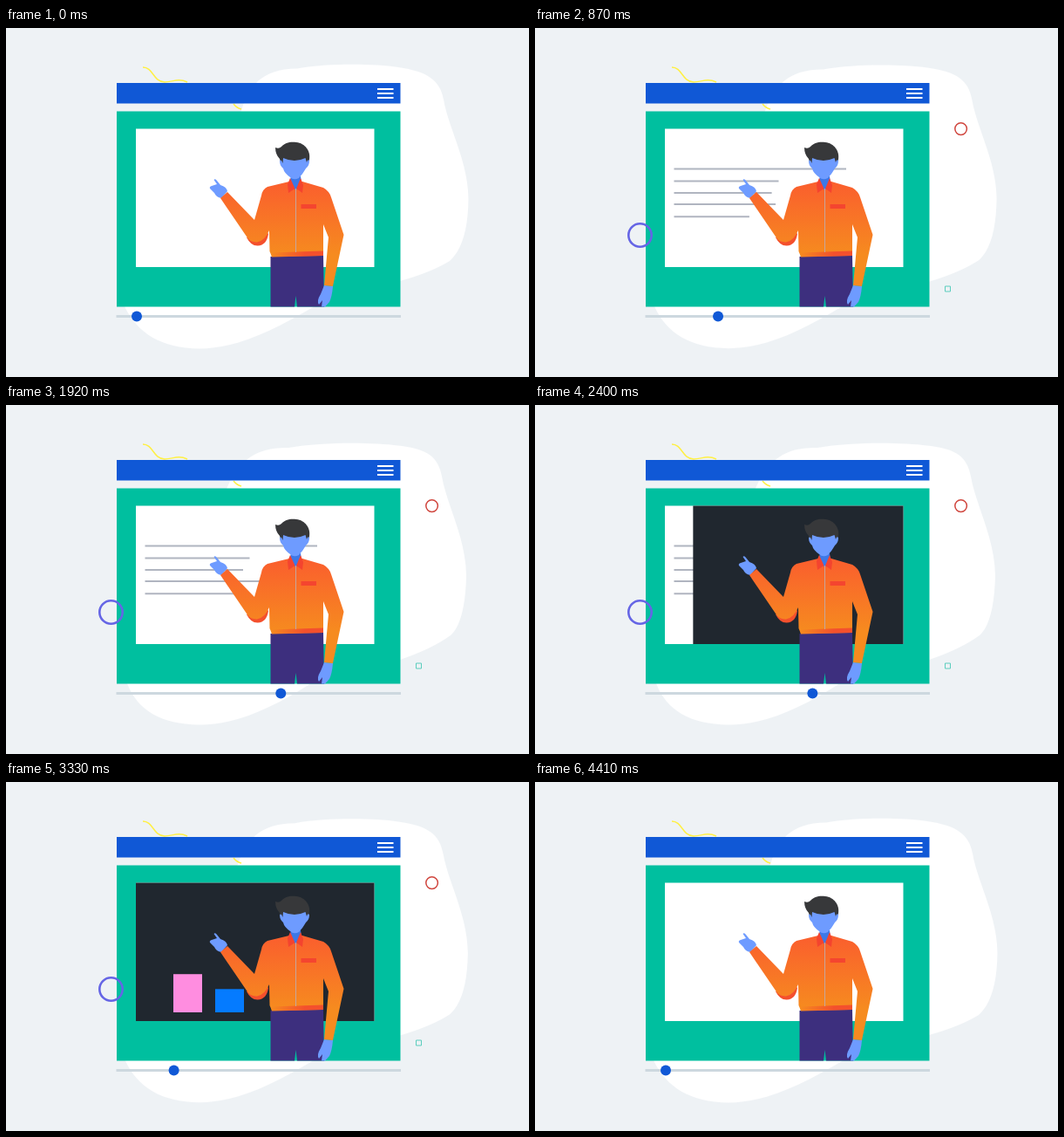
Animation, 600 px wide and 400 px high, one loop 4440 ms. Source, as an HTML page:

```html
<!DOCTYPE html>
<html lang="en">
<head>
<meta charset="utf-8">
<title>Video lesson</title>
<style>
  html, body { margin: 0; height: 100%; overflow: hidden; background: #eef2f5; }
  svg { display: block; width: 600px; height: 400px; }
</style>
</head>
<body>
<svg viewBox="0 0 600 400">
  <defs>
    <linearGradient id="shirt" gradientUnits="userSpaceOnUse" x1="0" y1="180" x2="0" y2="260">
      <stop offset="0" stop-color="#fa602d"/>
      <stop offset="1" stop-color="#f68b1f"/>
    </linearGradient>
    <linearGradient id="band">
      <stop offset="0" stop-color="#f68b1f"/>
      <stop offset=".65" stop-color="#f4502d"/>
    </linearGradient>
  </defs>
  <path id="blob" fill="#fff"/>
  <path d="M157 45C169 45 168 61 182 62C191 62 197 57 208 62M261 87Q265 92 270 93" fill="none" stroke="#fff044" stroke-width="1.5"/>
  <path d="M127 63H452.5V86.5H127Z" fill="#1058d6"/>
  <path d="M426 70H444.5M426 75H444.5M426 80H444.5" stroke="#fff" stroke-width="2"/>
  <path d="M127 95.5H452.5V319.5H127Z" fill="#00bf9f"/>
  <path d="M149 115.5H422.5V274H149Z" fill="#fff"/>
  <g id="lines" stroke="#b0b5c0" stroke-width="2"></g>
  <rect id="dark" y="115.5" height="158.5" fill="#20272f"/>
  <g id="bars"></g>

  <g id="presenter">
    <path d="M303.500 262L364 260L365 319.500H334L332.500 307L331 319.500H303.500Z" fill="#3d2f7e"/>
    <path d="M365 295L375 296Q374 308 371 314L366 319.500H362L363 312L359 317Q356 313 361 305Z" fill="#6e9bff"/>
    <path d="M238.500 174Q240 172 242 175L246 180Q253 182 254 187L247 195Q241 194 239 189L234 184Q233 182 236 181L242 179Z" fill="#6e9bff"/>
    <path d="M276 240Q281 250 289 249.500Q299 249 301 236L298 232Z" fill="#f4502d"/>
    <path d="M325 176L300 182Q294 185 293 192L285 220L254 188L246 195L276 239Q280 246 288 245.500Q297 244 302 232L302.500 256L305 262L364 261V225L370 240L365 295L375 296L387.500 237L373 194Q371 187 364 183L340 176Z" fill="url(#shirt)"/>
    <path d="M304 257.500L364 255.500V261L305 262.500Z" fill="url(#band)"/>
    <path d="M327 170H338L339 179L332.500 186L325 178Z" fill="#3d78e6"/>
    <path d="M326 172L323 179L324 189L331.500 184ZM338 172L341 180L340 189L333 184Z" fill="#f4442f"/>
    <path d="M332.500 184V257" stroke="#c7a59a"/>
    <path d="M338.500 202H356V207H338.500Z" fill="#f4452f"/>
    <path d="M309 137Q313 139 316 136C320 131 327 130 333 131C343 132 350 141 348 151L346 158H316L314 150Q309 145 309 137Z" fill="#37383a"/>
    <path d="M318 149Q331 155 343.500 149L345 154Q346 150 348 152Q348 158 344 161Q340 168 336 172Q330 175 326 171Q319 166 318 161Q314 158 314 152Q316 150 317.500 155Z" fill="#6e9bff"/>
  </g>

  <path d="M126.500 330.500H453" stroke="#cdd8df" stroke-width="3"/>
  <circle id="knob" cy="330.500" r="6" fill="#1058d6"/>
  <g id="pops" fill="none">
    <circle r="13.200" stroke="#6565e5" stroke-width="2.600" data-x="120.500" data-y="237.500"/>
    <circle r="6.800" stroke="#d0463e" stroke-width="1.500" data-x="488.600" data-y="115.600"/>
    <path d="M-3-3H3V3H-3Z" stroke="#5bcdbd" data-x="473.500" data-y="299"/>
  </g>
</svg>
<script>
const LOOP = 4440;
const $ = id => document.getElementById(id);
const progress = (t, start, length) => Math.min(1, Math.max(0, (t - start) / length));
const easeInOut = p => (1 - Math.cos(Math.PI * p)) / 2;
const easeOut = p => 1 - (1 - p) ** 3;
const easeOutBack = (p, s = 3.4) => 1 + (s + 1) * (p - 1) ** 3 + s * (p - 1) ** 2;

function add(parent, tag, attrs) {
  const el = document.createElementNS('http://www.w3.org/2000/svg', tag);
  for (const name in attrs) el.setAttribute(name, attrs[name]);
  return parent.appendChild(el);
}

// y, right end, start time
const lines = [[161.5, 357, 300], [175.5, 279.5, 350], [189, 272, 390], [202, 294, 490], [216.3, 268, 520]]
  .map(([y, end, start]) => ({ end, start, el: add($('lines'), 'line', { x1: 159.5, y1: y, y2: y }) }));

// x, height
const bars = [[192, 68], [240, 107], [291.5, 50], [342, 132.5]]
  .map(([x, height], i) => ({
    height, start: 3200 + i * 90,
    el: add($('bars'), 'rect', { x, width: 33, fill: i % 2 ? '#057bff' : '#ff8de0' })
  }));

function blobPath(k) {
  const m = (a, b) => a + (b - a) * k;
  return `M${m(270, 253)} 95C${m(278, 268)} ${m(68, 62)} ${m(292, 288)} ${m(47, 48)} ${m(334, 324)} ${m(46.5, 49)}
    C${m(372, 364)} ${m(40, 42)} 422 ${m(41, 43)} 450 ${m(45, 46.5)}
    C484 50 ${m(498, 496)} 60 ${m(502, 500)} 82
    C${m(508, 506)} 116 ${m(530, 527.5)} 152 ${m(530.5, 528)} 196
    C${m(530, 527)} 232 ${m(523, 521)} 254 ${m(509, 510)} ${m(267, 264)}
    Q488 280 452 ${m(290, 292)}L${m(353, 349)} 319.500
    C306 347 264 ${m(367.5, 366.5)} 222 ${m(367.5, 366.5)}
    C178 ${m(367, 366)} 151 350 ${m(136, 139)} 319Z`;
}

function draw(t) {
  const sweep = easeInOut(progress(t, 0, 2150)) - easeInOut(progress(t, 2305, 1540));
  $('knob').setAttribute('cx', 150 + 170 * sweep);
  $('blob').setAttribute('d', blobPath(sweep));

  for (const { el, start, end } of lines) {
    const p = easeInOut(progress(t, start, 500));
    el.setAttribute('x2', 159.5 + (end - 159.5) * p);
    el.style.display = p && t < 4350 ? '' : 'none';
  }

  const cover = t < 4350 ? 273.5 * easeOut(progress(t, 1925, 935)) : 0;
  $('dark').setAttribute('x', 422.5 - cover);
  $('dark').setAttribute('width', cover);

  for (const { el, start, height } of bars) {
    const h = height * (easeOut(progress(t, start, 450)) - easeInOut(progress(t, 4020, 300)));
    el.setAttribute('y', 264 - h);
    el.setAttribute('height', Math.max(0, h));
  }

  const scale = easeOutBack(progress(t, 30, 510)) * (1 - easeInOut(progress(t, 4000, 320)));
  for (const el of $('pops').children) {
    el.setAttribute('transform', `translate(${el.dataset.x} ${el.dataset.y}) scale(${scale})`);
    el.style.display = scale > 0.001 ? '' : 'none';
  }
}

const origin = performance.now();
function tick() {
  draw((performance.now() - origin) % LOOP);
  requestAnimationFrame(tick);
}
tick();
</script>
</body>
</html>
```
